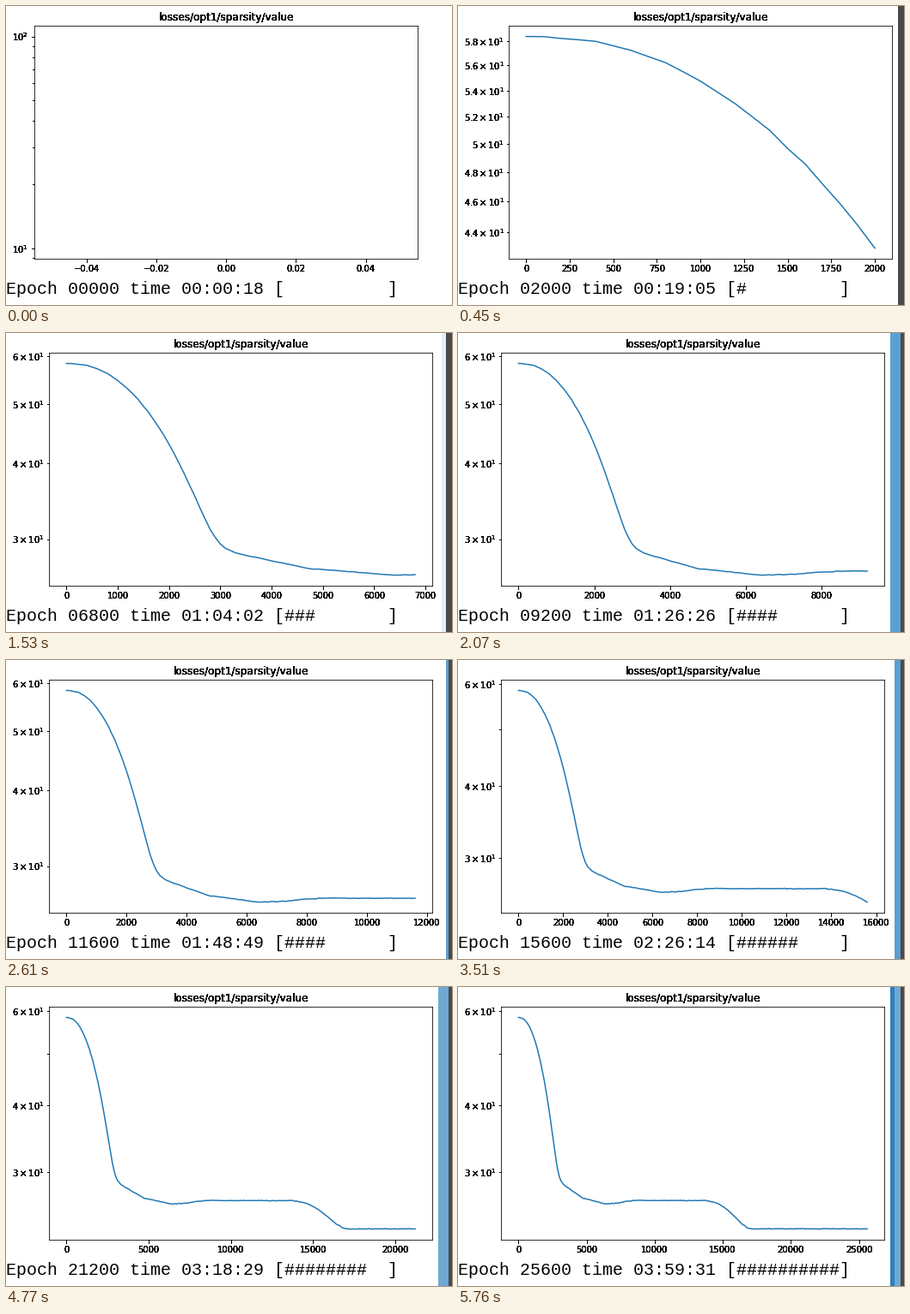
Write a matplotlib script that moves like this. It is 519 px wide and 349 px high and loops after 5850 ms.

```python
import numpy as np
import matplotlib.pyplot as plt
from matplotlib.animation import FuncAnimation
from matplotlib.patches import Rectangle
from matplotlib.transforms import IdentityTransform

W, H, DPI = 519, 349, 72
FRAMES, INTERVAL = 65, 90
EPOCHS_PER_FRAME, LOG_STEP = 400, 100
TOTAL_EPOCHS = 26000
START_LOSS = 58.4
LEFT, PAD = 50, 7.2  # default left edge of the axes, margin of the plot

GREY, BLUE, SKY = "#4a4a4a", "#2f7fbe", "#6fa8d4"

# What lies behind the plot: first frame, then (right edge, colour) bands
BACKDROPS = [
    (0, [(W, "white")]),
    (1, [(W, GREY), (512, "#222222")]),
    (12, [(W, GREY), (512, "#dfeff8")]),
    (22, [(W, GREY), (515, "#5b9fd2")]),
    (43, [(W, GREY), (515, SKY)]),
    (57, [(W, GREY), (515, SKY), (508, BLUE)]),
]

plt.rcParams.update({"font.family": "DejaVu Sans", "font.size": 10})


def loss_curve():
    """Loss by epoch: a fall, a slow dip to a plateau, one more step down."""
    epochs = np.arange(0, (FRAMES - 1) * EPOCHS_PER_FRAME + 1, LOG_STEP)
    k = epochs / 1000

    # Drops are in decades below the start
    fall = .028 * k ** 2.25
    tail = np.interp(k, [2.5, 4.7, 6.4, 7.2, 8.4],
                     [.2982, .3375, .3487, .3473, .3422])
    soft = .028
    drop = -soft * np.logaddexp(-fall / soft, -tail / soft)
    u = np.clip((k - 13) / 4.1, 0, 1) ** 1.7
    drop += .053 * u * u * (3 - 2 * u)

    drop += np.random.default_rng(4).normal(0, .0003, len(k))
    drop[0] = 0
    return epochs, START_LOSS * 10 ** -drop


def status(epoch):
    secs = round(np.interp(
        epoch, [0, 4400, 6800, 11600, 15600, 21200, 25600],
        [18, 2497, 3842, 6529, 8774, 11909, 14371]))
    clock = f"{secs // 3600:02d}:{secs // 60 % 60:02d}:{secs % 60:02d}"
    bar = "#" * round(10 * epoch / TOTAL_EPOCHS)
    return f"Epoch {epoch:05d} time {clock} [{bar:<10}]"


def harden(img, dpi):
    """Make the soft edges of text almost solid."""
    img = img.copy()
    img[..., :3] = 0
    img[..., 3] = np.minimum(1, 4 * img[..., 3])
    return img, 0, 0


def axes_box(left):
    return [left / W, 54 / H, 446.4 / W, 271.8 / H]


def band():
    return fig.add_artist(Rectangle((0, 0), 0, H, lw=0, zorder=-1,
                                    transform=IdentityTransform()))


epochs, losses = loss_curve()
fig = plt.figure(figsize=(W / DPI, H / DPI), dpi=DPI, facecolor="white")
ax = fig.add_axes(axes_box(LEFT))
title = ax.set_title("losses/opt1/sparsity/value", fontsize=12)
line, = ax.semilogy(epochs[:1], losses[:1], color="#1f77b4", lw=1.5)
for part in (title, ax.xaxis, ax.yaxis):
    part.set_agg_filter(harden)

label = fig.text(0, 13 / H, "", family="Liberation Mono", fontsize=20,
                 va="baseline", color="black")
bands = [band() for _ in range(3)]
page = band()
page.set_facecolor("white")


def fit_plot():
    """Shift the axes to clear their labels; return the plot's right edge."""
    ax.set_position(axes_box(LEFT))
    box = ax.get_tightbbox(fig.canvas.get_renderer())
    left = round(LEFT + PAD - box.x0)
    ax.set_position(axes_box(left))
    return int(box.x1 + left - LEFT + PAD - .5)


def update(frame):
    epoch = frame * EPOCHS_PER_FRAME
    n = epoch // LOG_STEP + 1
    line.set_data(epochs[:n], losses[:n])
    ax.relim()
    ax.autoscale_view()
    page.set_width(fit_plot())
    label.set_text(status(epoch))

    backdrop = [parts for first, parts in BACKDROPS if first <= frame][-1]
    for item in bands:
        item.set_width(0)
    for item, (right, colour) in zip(bands, backdrop):
        item.set_width(right)
        item.set_facecolor(colour)
    return line, label, page, *bands


anim = FuncAnimation(fig, update, frames=FRAMES, interval=INTERVAL,
                     init_func=lambda: update(0), repeat=True,
                     repeat_delay=0, blit=False)
plt.show()
```
